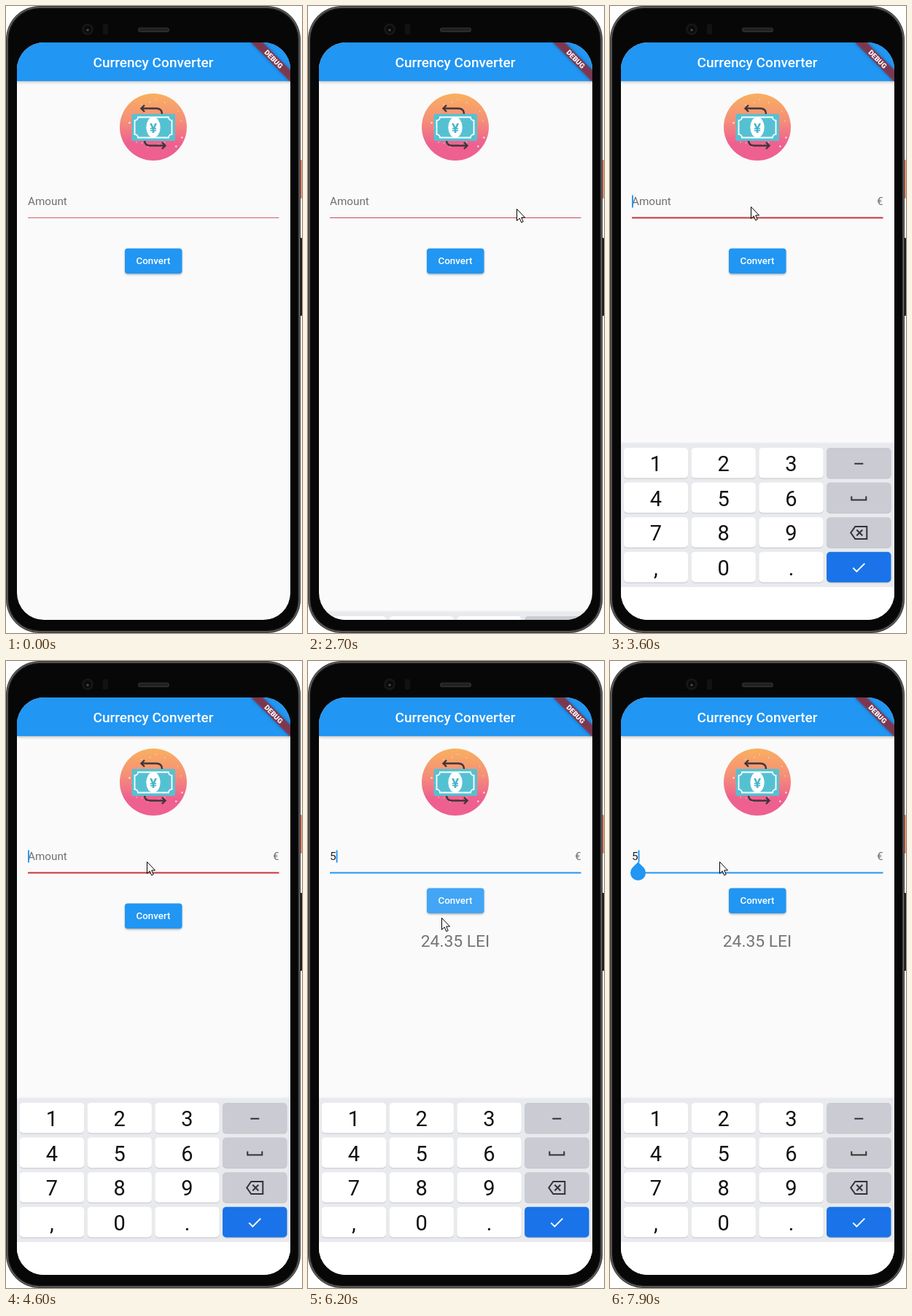
Write an HTML page with a canvas that moves like this. It is 406 px wide and 860 px high and loops after 8 s.

```html
<!DOCTYPE html>
<html lang="en">
<head>
<meta charset="utf-8">
<title>Currency Converter</title>
<style>
  html, body { margin: 0; width: 100%; height: 100%; overflow: hidden; background: #fff; }
  canvas { display: block; width: 406px; height: 860px; }
</style>
</head>
<body>
<canvas id="stage" width="406" height="860"></canvas>
<script>
const ctx = document.getElementById('stage').getContext('2d');
const W = 406, H = 860, LOOP = 8000, STEP = 100;
const DP = 0.954; // stage pixels per app unit
const BLUE = '#2196f3', RED = '#c9353b', GREY = '#707070';
const SCREEN = { x: 15, y: 50, w: 375, h: 792 };
const MID = SCREEN.x + SCREEN.w / 2 - 0.5;
const AT = { open: 2700, focus: 2800, type: 4900, press: 5800, result: 6000, release: 6400, tap: 7700 };

// Pointer stops: arrival time, x, y. Every move takes TRAVEL ms.
const TRAVEL = 300;
const STOPS = [
  [2400, 286, 278], [3000, 193, 275], [5700, 183, 352], [6600, 205, 420],
  [7100, 334, 310], [7400, 214, 328], [7800, 150, 275]
];

const clamp = k => Math.min(1, Math.max(0, k));
const easeOut = k => 1 - (1 - k) ** 2;
const mix = (a, b, k) => a + (b - a) * k;

function group(draw) {
  ctx.save();
  draw();
  ctx.restore();
}

function box(x, y, w, h, r, fill) {
  ctx.beginPath();
  ctx.roundRect(x, y, w, h, r);
  ctx.fillStyle = fill;
  ctx.fill();
}

function oval(x, y, rx, ry, fill) {
  ctx.beginPath();
  ctx.ellipse(x, y, rx, ry, 0, 0, Math.PI * 2);
  ctx.fillStyle = fill;
  ctx.fill();
}

function outline(path, color, width) {
  ctx.strokeStyle = color;
  ctx.lineWidth = width;
  ctx.stroke(new Path2D(path));
}

function text(str, x, y, size, color, weight = 400, align = 'center') {
  ctx.font = `${weight} ${size}px Roboto, sans-serif`;
  ctx.textAlign = align;
  ctx.fillStyle = color;
  ctx.fillText(str, x, y);
}

function shadow(alpha, blur, dy) {
  ctx.shadowColor = `rgba(0,0,0,${alpha})`;
  ctx.shadowBlur = blur;
  ctx.shadowOffsetY = dy;
}

function phone() {
  box(401, 211, 5, 53, 1, '#d98872');
  box(401, 318, 5, 107, 1, '#1c1c1c');
  ['#2c2c2c', '#707070', '#383838', '#141414', '#070707'].forEach((tone, inset) => {
    box(inset, inset, 404 - 2 * inset, H - 2 * inset, 46 - inset, tone);
  });
  oval(112, 32, 8, 8, '#161616');
  oval(112, 32, 5, 5, '#0a0a0c');
  oval(112, 33, 1.8, 1.8, '#45454b');
  box(133, 25, 7, 14, 1, '#121212');
  box(181, 29.5, 43, 6.5, 3, '#2b2b2b');
  box(183, 31, 39, 3, 1.5, '#202020');
}

function debugRibbon() {
  group(() => {
    ctx.translate(SCREEN.x + SCREEN.w, SCREEN.y);
    ctx.rotate(Math.PI / 4);
    ctx.scale(DP, DP);
    shadow(0.5, 4, 0);
    box(-40, 28, 80, 12, 0, 'rgba(183,28,28,.63)');
    shadow(0, 0, 0);
    text('DEBUG', 0, 37.6, 10.2, '#fff', 900);
  });
}

function appBar() {
  group(() => {
    shadow(0.3, 4, 1);
    box(SCREEN.x, SCREEN.y, SCREEN.w, 53, 0, BLUE);
  });
  text('Currency Converter', MID, 83.5, 20 * DP, '#fff', 500);
}

function iconArrow() {
  outline('M12-18Q12-25.5 4-25.5H-16M-12-30L-16.5-25.5L-12-21', '#3f373c', 2.4);
}

// Frame whose four corners are scooped inwards
function noteFrame(w, h, r) {
  ctx.beginPath();
  for (let k = 0; k < 4; k++) {
    const x = k === 1 || k === 2 ? w : -w, y = k < 2 ? -h : h;
    const end = k * Math.PI / 2;
    ctx.arc(x, y, r, end + Math.PI / 2, end, true);
  }
  ctx.closePath();
  ctx.strokeStyle = '#fff';
  ctx.lineWidth = 1.8;
  ctx.stroke();
}

function moneyIcon() {
  group(() => {
    ctx.translate(202, 166);
    const sky = ctx.createLinearGradient(0, -46, 0, 46);
    sky.addColorStop(0, '#f9b05f');
    sky.addColorStop(0.4, '#f58f78');
    sky.addColorStop(0.75, '#ee6090');
    oval(0, 0, 46, 46, sky);
    for (let i = 0; i < 18; i++) {
      const angle = i * 2.4, r = 24 + (i * 7) % 19, size = i % 4 ? 0.7 : 1.2;
      oval(Math.cos(angle) * r, Math.sin(angle) * r, size, size, '#fde3dc');
    }
    iconArrow();
    ctx.rotate(Math.PI);
    iconArrow();
    ctx.rotate(Math.PI);
    box(-29.5, -18, 59.5, 37, 2, '#54c1d2');
    ctx.translate(0, 0.5);
    noteFrame(25.5, 14, 4.5);
    oval(0, 0, 9.7, 14.2, '#fff');
    text('¥', 0, 7, 19, '#45b5c8', 700);
  });
}

function caretOn(t) {
  if (t < AT.focus) return false;
  const reset = t < AT.type ? 2500 : t < AT.tap ? AT.type : AT.tap;
  return (t - reset) % 1000 < 500;
}

function amountField(t) {
  const { x } = SCREEN, focused = t >= AT.focus, typed = t >= AT.type;
  const left = x + 15, width = 344.5, size = 16 * DP;
  if (typed) text('5', left, 272.5, size, '#222', 400, 'left');
  else text('Amount', left, 272.5, size, GREY, 400, 'left');
  if (focused) {
    text('€', left + width, 272.5, size, GREY, 400, 'right');
    box(left, 289.5, width, 1.9, 0, t >= AT.result ? BLUE : RED);
  } else {
    box(left, 290, width, 1, 0, t < AT.open ? '#cf6070' : '#c94a55');
  }
  if (caretOn(t)) box(typed ? left + 8.6 : left, 259.5, 1.9, 17, 0, BLUE);
  if (t > AT.tap) {
    group(() => {
      ctx.translate(left + 8.5, 290.5);
      ctx.rotate(Math.PI / 4);
      box(-10.5, -10.5, 21, 21, [0, 10.5, 10.5, 10.5], BLUE);
    });
  }
}

function convertButton(t) {
  const y = t >= AT.result ? 311.5 : 332.5;
  const tone = t >= AT.press && t < AT.release ? '#42a5f5' : BLUE;
  group(() => {
    shadow(0.3, 2.5, 1.4);
    box(163, y, 78.5, 34.5, 3.8, tone);
  });
  text('Convert', MID, y + 21.7, 14 * DP, '#fff', 500);
}

const KEY_ROWS = ['123', '456', '789', ',0.'];
const KEY_ICONS = ['M-6 0H6', 'M-10-3V2H10V-3', 'M-5-9H11V8H-5L-11-.5ZM-3-4.5L5 3.5M5-4.5L-3 3.5', 'M-8 0L-3 5L8-6'];

function key(row, col) {
  const w = 88.4, h = 41.6, last = row === 3;
  const x = 18.7 + col * 92.8, y = 606 + row * 47.6;
  const fill = col < 3 ? '#fff' : last ? '#1a73e8' : '#cacbd3';
  box(x, y + 1, w, h, 5, '#c3c5ca');
  box(x, y, w, h, 5, fill);
  group(() => {
    ctx.translate(x + w / 2, y + h / 2 + 1);
    if (col < 3) text(KEY_ROWS[row][col], 0, 10.2, 29, '#111');
    else outline(KEY_ICONS[row], last ? '#fff' : '#333', 2);
  });
}

function keyboard(t) {
  if (t < AT.open) return;
  group(() => {
    ctx.translate(0, 231 * (1 - easeOut(clamp((t - AT.open) / 200))));
    group(() => {
      shadow(0.12, 3, 0);
      box(SCREEN.x, 600, SCREEN.w, 250, 0, '#e8eaed');
    });
    box(SCREEN.x, 797, SCREEN.w, 60, 0, '#fff');
    for (let i = 0; i < 16; i++) key(i >> 2, i % 4);
  });
}

function pointer(t) {
  if (t < STOPS[0][0]) return;
  let [, x, y] = STOPS[0];
  for (const [arrive, toX, toY] of STOPS.slice(1)) {
    const k = easeOut(clamp((t - arrive + TRAVEL) / TRAVEL));
    x = mix(x, toX, k);
    y = mix(y, toY, k);
  }
  group(() => {
    ctx.translate(x + 0.5, y + 0.5);
    const arrow = 'M0 0V16L3.7 12.6L6.2 18.4L8.7 17.3L6.2 11.6H11Z';
    ctx.fillStyle = '#fff';
    ctx.fill(new Path2D(arrow));
    outline(arrow, '#000', 1);
  });
}

function render(t) {
  ctx.fillStyle = '#fff';
  ctx.fillRect(0, 0, W, H);
  phone();
  group(() => {
    ctx.beginPath();
    ctx.roundRect(SCREEN.x, SCREEN.y, SCREEN.w, SCREEN.h, 37);
    ctx.clip();
    box(SCREEN.x, SCREEN.y, SCREEN.w, SCREEN.h, 0, '#fafafa');
    appBar();
    moneyIcon();
    amountField(t);
    convertButton(t);
    if (t >= AT.result) text('24.35 LEI', MID, 392, 24 * DP, '#757575');
    keyboard(t);
    debugRibbon();
  });
  pointer(t);
}

const start = performance.now();
function tick() {
  const t = (performance.now() - start) % LOOP;
  render(Math.floor(t / STEP) * STEP);
  requestAnimationFrame(tick);
}
tick();
</script>
</body>
</html>
```
